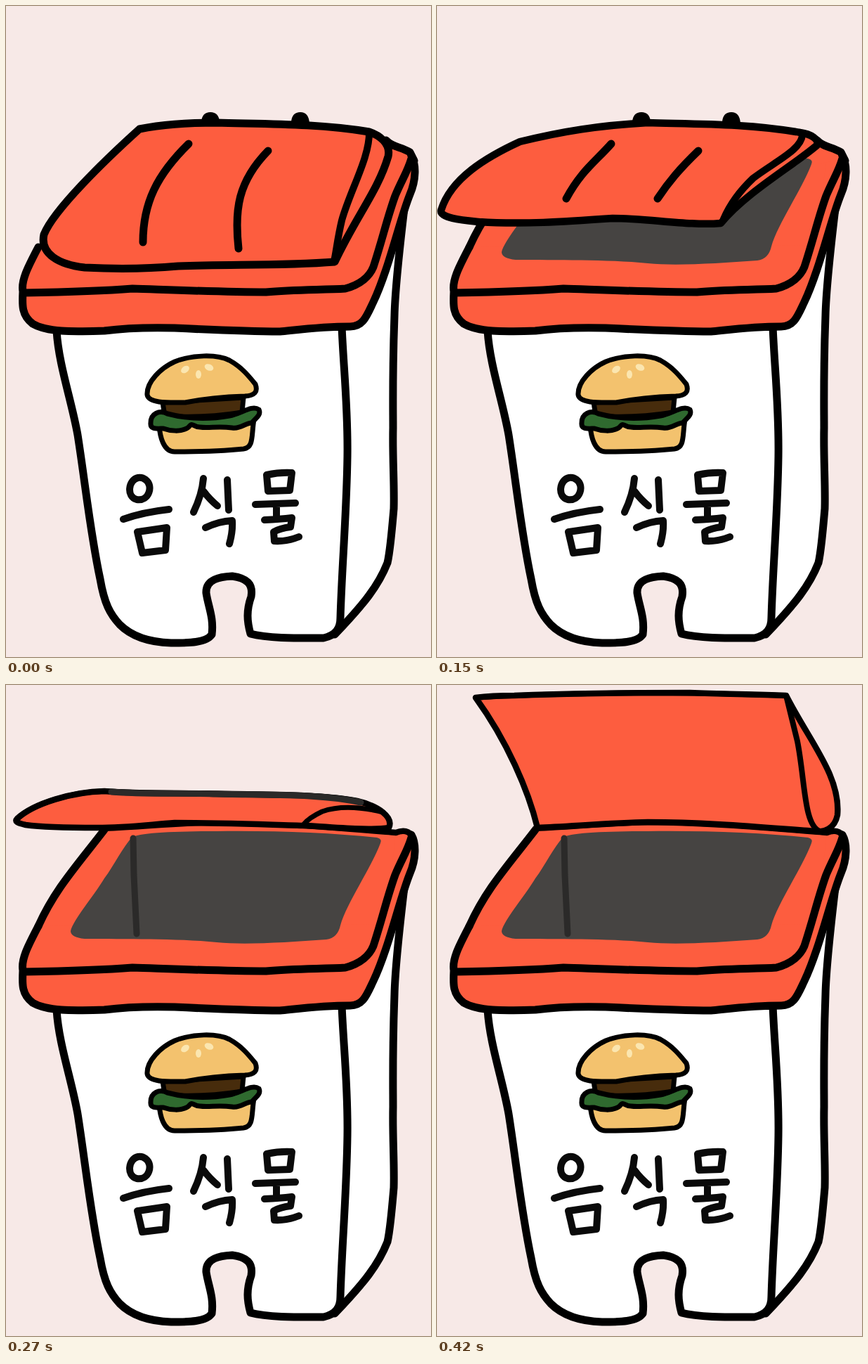
Animation of 605 by 926 pixels, one loop 450 ms. Source, as an HTML page:

```html
<!DOCTYPE html>
<html lang="ko">
<head>
<meta charset="utf-8">
<title>음식물</title>
<style>
html, body { margin: 0; width: 100%; height: 100%; overflow: hidden; background: #f7e9e7; }
svg { display: block; width: 605px; height: 926px; }
path { stroke-linecap: round; stroke-linejoin: round; }
.ink { stroke: #000; stroke-width: 11; fill: none; }
.red { fill: #fd5d3f; }
.white { fill: #fff; }
.dark { fill: #464442; }
.bun { fill: #f3c26e; }
.food { stroke: #000; stroke-width: 7; }
.word { stroke: #0a0a0a; stroke-width: 10; fill: none; }

/* each stretch advances in 30 ms poses */
.lid, .fold, .stripe, .lip { animation: 450ms -0.5ms infinite; }
.lid { animation-name: lid; }
.fold { animation-name: fold; }
.s1 { animation-name: s1; }
.s2 { animation-name: s2; }
.lip { animation-name: lip; stroke-width: 7.5px; }
.shut, .open, .back, .inside, .edge { animation: 450ms -0.5ms infinite step-end; }
.shut { animation-name: shut; }
.open { animation-name: open; }
.back { animation-name: back; }
.inside { animation-name: inside; }
.edge { animation-name: edge; }

@keyframes shut { 0% { opacity: 1 } 60%, to { opacity: 0 } }
@keyframes open { 0% { opacity: 0 } 60%, to { opacity: 1 } }
@keyframes back { 0% { opacity: 0 } 33.333%, to { opacity: 1 } }
@keyframes inside { 0% { opacity: 0 } 46.666%, to { opacity: 1 } }
@keyframes edge { 0% { opacity: 0 } 60% { opacity: 1 } 66.666%, to { opacity: 0 } }

@keyframes lid {
  0% { animation-timing-function: steps(3); stroke-width: 11px;
    d: path("M54 325C68 290 140 220 190 175C225 168 265 166 300 166C370 168 445 167 517 179C532 184 548 196 544 214C530 262 498 300 468 364C390 370 320 367 245 370C200 374 150 374 112 372C75 368 48 352 54 325Z") }
  20% { animation-timing-function: steps(2); stroke-width: 11px;
    d: path("M27 325C40 280 90 200 180 176C220 167 260 166 300 166C370 168 445 167 517 179C532 184 548 194 542 207C515 258 480 312 428 346C380 352 300 344 215 340C150 345 80 347 28 340C25 338 24 333 27 325Z") }
  33.333% { animation-timing-function: steps(2); stroke-width: 10.5px;
    d: path("M6 290C20 245 70 215 118 193C180 178 230 170 300 166C370 168 445 167 517 180C532 182 545 190 541 198C510 225 440 265 404 309C360 313 300 302 250 302C180 307 120 311 60 307C40 305 2 302 6 290Z") }
  46.666% { animation-timing-function: steps(2); stroke-width: 10px;
    d: path("M12 228C30 195 85 165 155 157C210 157 260 162 300 163C380 167 450 169 515 178C530 180 545 190 540 203C532 222 465 222 395 244C330 244 260 240 185 243C140 246 80 247 40 243C20 241 6 238 12 228Z") }
  60% { animation-timing-function: steps(2); stroke-width: 8.5px;
    d: path("M16 190C40 168 95 152 140 151C200 156 250 153 300 155C390 157 450 155 500 165C530 172 552 188 545 203C520 207 470 203 428 200C380 199 320 196 240 196C200 199 170 203 130 203C90 203 50 202 28 199C15 196 12 194 16 190Z") }
  73.333% { animation-timing-function: steps(3); stroke-width: 8.5px;
    d: path("M40 160C55 145 80 138 110 136C190 132 260 133 360 130C420 132 470 138 515 148C545 155 580 175 574 190C570 202 555 208 535 208C460 203 390 196 300 195C250 196 190 200 132 206C110 185 70 172 40 160Z") }
  93.333%, to { stroke-width: 8.5px;
    d: path("M55 18C70 16 90 15 110 15C190 12 280 11 360 11C410 13 450 13 497 15C530 80 575 130 570 185C566 205 550 210 540 208C470 203 390 195 300 195C250 196 190 201 143 203C130 150 100 80 55 18Z") }
}
@keyframes fold {
  0% { animation-timing-function: steps(3); stroke-width: 10px;
    d: path("M517 179C518 215 490 262 478 305C472 330 470 350 467 363") }
  20% { animation-timing-function: steps(2); stroke-width: 10px;
    d: path("M517 182C502 222 478 252 457 278C440 298 430 318 426 342") }
  33.333% { animation-timing-function: steps(2); stroke-width: 10px;
    d: path("M520 184C518 205 480 222 450 245C432 262 418 280 408 303") }
  46.666% { animation-timing-function: steps(2); stroke-width: 8px;
    d: path("M505 180C470 190 430 205 410 218C395 228 388 236 385 243") }
  60% { animation-timing-function: steps(2); stroke-width: 7px;
    d: path("M537 181C500 172 470 173 450 180C435 187 428 193 424 198") }
  73.333% { animation-timing-function: steps(3); stroke-width: 7.5px;
    d: path("M520 150C500 143 458 142 455 152C485 163 515 180 532 207") }
  93.333%, to { stroke-width: 8px;
    d: path("M497 15C502 35 508 60 513 80C524 135 522 200 545 208") }
}
@keyframes s1 {
  0% { animation-timing-function: steps(3); opacity: 1; d: path("M260 196C215 240 195 280 195 336") }
  20% { animation-timing-function: steps(2); opacity: 1; d: path("M260 193C220 225 190 285 183 335") }
  33.333% { animation-timing-function: steps(2); opacity: 1; d: path("M248 196C225 222 205 235 184 274") }
  46.666% { animation-timing-function: step-end; opacity: 1; d: path("M242 183C210 190 180 215 172 238") }
  53.333% { animation-timing-function: step-end; opacity: 1; d: path("M241 174C212 180 185 198 176 218") }
  60%, to { opacity: 0; d: path("M240 165C215 170 190 180 180 198") }
}
@keyframes s2 {
  0% { animation-timing-function: steps(3); opacity: 1; d: path("M373 206C330 250 325 290 331 345") }
  20% { animation-timing-function: steps(2); opacity: 1; d: path("M373 206C330 245 312 290 311 338") }
  33.333% { animation-timing-function: steps(2); opacity: 1; d: path("M372 206C345 232 330 250 314 274") }
  46.666% { animation-timing-function: step-end; opacity: 1; d: path("M347 187C310 195 275 220 272 240") }
  53.333% { animation-timing-function: step-end; opacity: 1; d: path("M344 176C310 183 280 200 276 219") }
  60%, to { opacity: 0; d: path("M340 165C312 170 285 180 280 198") }
}
@keyframes lip {
  0% { animation-timing-function: step-end; opacity: 0; d: path("M16 190C40 168 95 152 140 151C260 157 430 150 500 165") }
  60% { animation-timing-function: steps(2); opacity: 1; d: path("M16 190C40 168 95 152 140 151C260 157 430 150 500 165") }
  73.333% { animation-timing-function: steps(3); opacity: 1; d: path("M40 161C70 154 150 156 250 153C320 152 390 155 455 152") }
  93.333%, to { opacity: 1; d: path("M55 18C100 15 200 12 300 11C370 11 430 13 497 15") }
}
</style>
</head>
<body>
<svg viewBox="0 0 605 926">
  <!-- bin -->
  <path class="ink white" d="M567 288C562 330 554 400 553 440C550 520 551 570 551 600C550 640 553 680 552 715C549 750 547 775 543 792C530 825 510 850 468 894L478 440Z"/>
  <path class="ink white" d="M72 462C75 510 93 560 102 610C113 680 120 750 134 815C140 850 148 865 162 880C180 898 205 905 235 906C260 906 285 906 293 894C296 870 288 855 285 835C284 815 305 812 322 811C343 814 352 822 349 840C342 860 343 875 348 893C375 900 420 899 452 899C470 895 476 885 476 870C478 800 485 720 486 640C487 570 480 510 478 455"/>

  <!-- rim -->
  <path class="red" d="M25 408C25 385 38 360 50 338L150 260L525 204L575 211C588 225 583 245 575 268C560 320 540 380 520 425C510 445 505 455 490 455C440 457 410 463 380 463C300 460 240 456 190 458C140 463 90 464 60 461C30 452 20 435 25 408Z"/>
  <g class="back">
    <path class="red" d="M46 343C70 290 100 258 140 205L300 195L555 210L540 340Z"/>
    <path class="ink" d="M140 206C100 258 70 290 46 343"/>
  </g>
  <path class="shut red" d="M528 192L545 194L576 208L579 218L545 224L524 216Z"/>
  <path class="dark" d="M92 350C95 335 125 300 140 275C155 255 165 232 180 216C195 210 240 208 300 208C380 207 460 210 528 217Q536 219 533 225C520 260 485 310 476 342Q472 360 456 362C400 366 340 370 300 366C240 360 170 362 112 361Q92 359 92 350Z"/>
  <path class="inside" d="M181 218L182 270L186 354" fill="none" stroke="#2b2a29" stroke-width="9"/>
  <path class="ink" d="M46 343C32 370 21 390 24 406C23 425 22 440 38 452C60 465 100 463 140 462C170 458 200 457 240 458C300 461 350 463 390 463C420 460 450 456 490 456C508 456 513 442 522 423C545 375 560 305 575 268C584 247 584 225 577 213"/>
  <path class="ink" d="M25 408C80 407 130 406 180 402C240 404 310 407 370 407C410 403 450 404 483 402C505 396 518 384 523 371C535 335 543 300 554 270C563 248 572 235 577 217"/>
  <path class="ink open" style="stroke-width:8.5px" d="M140 204C200 201 250 196 300 195C390 196 470 203 555 210Q570 204 578 214"/>
  <g class="shut">
    <path class="ink" d="M541 191C550 201 562 200 575 208L581 220"/>
    <path d="M278 165Q279 151 291 151Q303 151 304 165ZM406 165Q407 151 419 151Q431 151 432 167Z"/>
  </g>

  <!-- lid -->
  <path class="ink red lid"/>
  <path class="ink fold"/>
  <path class="ink stripe s1"/>
  <path class="ink stripe s2"/>
  <path class="ink lip"/>
  <path class="edge" d="M150 152C200 156 250 153 300 155C390 157 450 155 505 167" fill="none" stroke="#2b2a29" stroke-width="9"/>

  <!-- burger -->
  <g class="food">
    <path class="bun" d="M218 596C219 612 224 634 240 634C270 634 310 633 338 630C353 628 349 612 353 588Z"/>
    <path fill="#472c0c" d="M223 564L226 583Q280 587 336 578L338 557Z"/>
    <path fill="#2f6a2f" d="M206 593C206 580 218 574 230 580C260 588 290 588 318 583C335 580 350 567 360 574C364 582 354 587 350 593C340 593 335 602 322 600C300 597 290 601 276 599C266 599 266 591 260 599C250 607 232 604 224 601C215 601 205 603 206 593Z"/>
    <path class="bun" d="M201 553C200 535 220 515 240 506C265 496 300 495 318 504C335 513 347 528 355 538C359 549 354 554 340 555C305 556 280 559 255 564C235 564 203 566 201 553Z"/>
  </g>
  <g fill="#fbe6b0">
    <ellipse cx="255" cy="517" rx="6.5" ry="4.5" transform="rotate(-38 255 517)"/>
    <ellipse cx="274" cy="524" rx="4" ry="6"/>
    <ellipse cx="289" cy="514" rx="6.5" ry="4.5" transform="rotate(22 289 514)"/>
  </g>

  <!-- handwritten label -->
  <g class="word" role="img" aria-label="음식물">
    <path d="M188 671C174 674 171 698 186 702C204 705 210 682 199 674Q194 670 188 671M167 730Q195 720 232 716M187 748L194 778L227 774L229 742L188 748"/>
    <path d="M281 672Q279 695 267 720M281 690Q290 702 301 711M315 674L317 717M284 742Q303 733 322 732Q323 748 318 765"/>
    <path d="M371 667L373 690L404 689L407 664Q390 663 371 667M355 709L412 707M385 710V728M368 731Q390 730 407 728L405 741Q390 743 381 748L382 761Q400 762 417 755"/>
  </g>
</svg>
</body>
</html>
```
